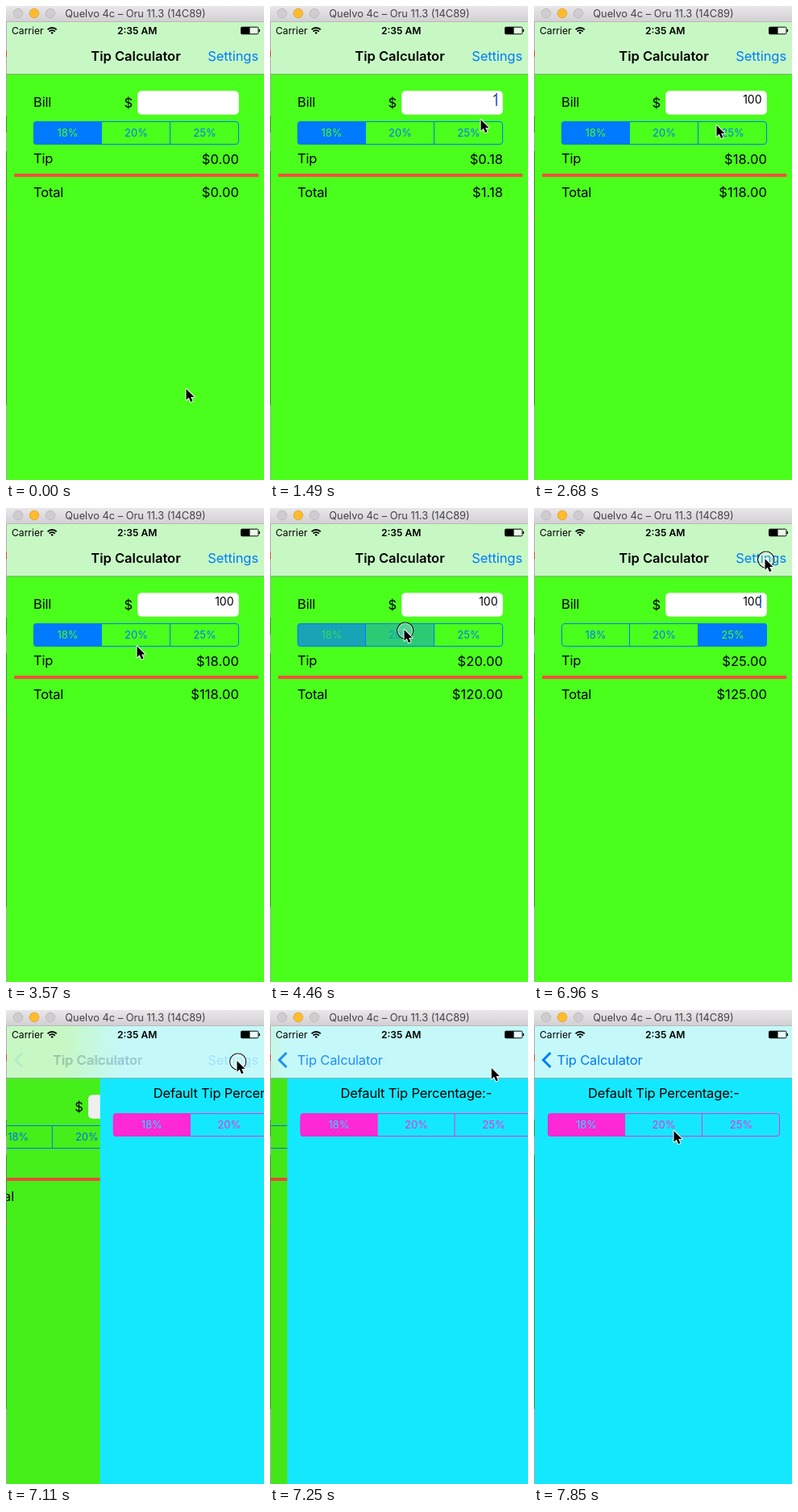
Recreate the animation shown at these times as an HTML page. Size 320 by 588 pixels, loop 7.99 s.

```html
<!DOCTYPE html>
<html lang="en">
<head>
<meta charset="utf-8">
<title>Tip Calculator</title>
<style>
  html, body { margin: 0; height: 100%; overflow: hidden; background: #4aff1b; }
  svg { display: block; width: 100vw; height: 100vh; }
  text { font: 16.5px Inter, Roboto, sans-serif; letter-spacing: -.17px; }
  .small text { font-size: 12.1px; letter-spacing: 0; }
  .seg text { font-size: 13px; letter-spacing: 0; text-anchor: middle; }
  .bold { font-weight: 600; }
  .mid { text-anchor: middle; }
  .end { text-anchor: end; }
  .sum { text-anchor: end; letter-spacing: .1px; }
  .link { fill: #007aff; }
</style>
</head>
<body>
<svg viewBox="0 0 320 588" preserveAspectRatio="none">
  <defs>
    <linearGradient id="chrome" x2="0" y2="1">
      <stop stop-color="#e9e7e9"/><stop offset="1" stop-color="#d1cfd2"/>
    </linearGradient>
    <linearGradient id="blur" gradientUnits="userSpaceOnUse" x1="-35" x2="35">
      <stop stop-color="#c7f8c4"/><stop offset="1" stop-color="#c5f9f9"/>
    </linearGradient>
    <clipPath id="segClip1"><rect x="34" y="143" width="255" height="29" rx="4"/></clipPath>
    <clipPath id="segClip2"><rect x="16" y="128" width="288" height="29" rx="4"/></clipPath>
  </defs>

  <g id="calc">
    <rect width="321" height="588" fill="#4aff1b"/>
    <text x="34" y="124.5">Bill</text>
    <text x="146.5" y="126">$</text>
    <rect x="163.2" y="105.2" width="125.6" height="29.6" rx="5" fill="#fff"/>
    <text id="bill" class="end" x="282.5" y="121" style="font-size:14px;letter-spacing:0"></text>
    <rect id="caret" x="280" y="108" width="1.8" height="16" fill="#4268d8"/>
    <g id="rates" class="seg"></g>
    <text x="34" y="194.5">Tip</text>
    <text id="tip" class="sum" x="289" y="195.5"></text>
    <rect x="10" y="208" width="303" height="4" fill="#fb4f3f"/>
    <text x="34" y="236.5">Total</text>
    <text id="total" class="sum" x="289" y="236.5"></text>
    <rect id="shade" width="420" height="588" opacity="0"/>
  </g>

  <g id="prefs">
    <rect width="320" height="588" fill="#14e8ff"/>
    <text x="66" y="108.5">Default Tip Percentage:-</text>
    <g id="defaults" class="seg"></g>
  </g>

  <rect y="20" width="320" height="65" fill="#c7f8c4"/>
  <g id="tint"><rect x="-35" y="20" width="400" height="65" fill="url(#blur)"/></g>
  <rect y="84" width="320" height="1" opacity=".3"/>
  <g id="bar">
    <text id="heading" class="bold mid" y="68" style="letter-spacing:0">Tip Calculator</text>
    <text class="link end" x="313" y="68" style="letter-spacing:-.1px">Settings</text>
  </g>
  <g id="back">
    <path d="M20.5 53L11.5 62L20.5 71" fill="none" stroke="#007aff" stroke-width="3"/>
    <text id="backText" class="link" y="68">Tip Calculator</text>
  </g>

  <g class="small">
    <text x="7" y="34.5">Carrier</text>
    <text class="bold mid" x="162.7" y="34.5">2:35 AM</text>
  </g>
  <g fill="none" stroke="#000" stroke-width="1.8">
    <path d="M51.6 29.3A8 8 0 0 1 62.8 29.3M53.6 31.6A5 5 0 0 1 60.8 31.6"/>
    <path d="M57.2 35L55.5 33.2A2.4 2.4 0 0 1 58.9 33.2Z" fill="#000" stroke="none"/>
    <rect x="291.5" y="26.2" width="21.5" height="8.6" rx="1.5" stroke-width="1" fill="#fff" fill-opacity=".6"/>
    <path d="M291.5 26.2H302.5V34.8H291.5Z" fill="#000" stroke="none"/>
    <path d="M314.3 29V32" stroke-width="1.4"/>
  </g>

  <rect width="320" height="20" fill="url(#chrome)"/>
  <rect y="19" width="320" height="1" fill="#bab8bb"/>
  <g stroke-width=".8" stroke="#b9b7ba" fill="#cecccf">
    <circle cx="15" cy="9" r="5.8"/>
    <circle cx="35" cy="9" r="5.8" fill="#fdbb2d" stroke="#e0a02a"/>
    <circle cx="55" cy="9" r="5.8"/>
  </g>
  <text class="mid" x="160.5" y="14" fill="#434244" style="font-size:12.8px;letter-spacing:0">Quelvo 4c – Oru 11.3 (14C89)</text>
  <path d="M0 20h1v116h-1zM0 157h1v23h-1zM0 495h1v93h-1z" fill="#b3a3b3"/>
  <path d="M0 136h1v21h-1zM0 180h1v315h-1z" fill="#4f8a40"/>
  <path d="M0 55h1v8h-1zM0 260h1v4h-1z" fill="#e8402c"/>

  <g id="pointer">
    <g id="press" fill="none">
      <circle cx="1.7" cy="1" r="10" fill="#fff" fill-opacity=".2" stroke="#000" stroke-width="1.1"/>
      <circle cx="1.7" cy="1" r="9" stroke="#fff" stroke-opacity=".7"/>
    </g>
    <path d="M.5 0V13.8L3.7 10.8L6.1 16.2L8.5 15.1L6.2 9.9H10.5Z" stroke="#fff" stroke-width="1.9" stroke-linejoin="round" paint-order="stroke"/>
  </g>
</svg>
<script>
const LOOP = 7990, STEPS = 54, RATES = [18, 20, 25];
const $ = id => document.getElementById(id);
const set = (el, name, value) => el.setAttribute(name, value);

// pointer tip: step, x, y
const PATH = [
  [0, 223, 475], [5, 175, 119], [6, 175, 119], [9, 261, 141], [15, 261, 141],
  [18, 226, 148], [20, 195, 98], [22, 176, 171], [23, 174, 168], [25, 150, 175],
  [28, 166, 151], [32, 166, 151], [36, 238, 155], [38, 238, 155], [39, 289, 71],
  [42, 295, 66], [44, 286, 63], [48, 286, 63], [53, 173, 150]
];
const PRESSES = [6, 30, 36, 46, 47, 48];

function segments(id, clip, x, y, w, color, bg) {
  const cell = w / 3;
  const fills = RATES.map((r, i) =>
    `<rect x="${x + i * cell}" y="${y}" width="${cell}" height="29" fill="${color}"/>`).join('');
  const labels = RATES.map((r, i) =>
    `<text x="${x + (i + .5) * cell}" y="${y + 19}">${r}%</text>`).join('');
  $(id).innerHTML = `<g clip-path="url(#${clip})">${fills}</g>
    <g fill="none" stroke="${color}">
      <rect x="${x + .5}" y="${y + .5}" width="${w - 1}" height="28" rx="3.5"/>
      <path d="M${x + cell - .5} ${y}v29M${x + 2 * cell - .5} ${y}v29"/>
    </g>${labels}`;
  const rects = $(id).querySelectorAll('g[clip-path] rect');
  const texts = $(id).querySelectorAll('text');
  // previous differs from chosen while the highlight cross-fades
  return (chosen, previous) => RATES.forEach((r, i) => {
    const fading = chosen !== previous && (i === chosen || i === previous);
    set(rects[i], 'opacity', fading ? (i === previous ? .68 : .4) : +(i === chosen));
    set(texts[i], 'fill', i === previous ? bg : color);
    set(texts[i], 'opacity', fading ? .6 : 1);
  });
}
const showRates = segments('rates', 'segClip1', 34, 143, 255, '#007aff', '#4aff1b');
segments('defaults', 'segClip2', 16, 128, 288, '#ff28d6', '#14e8ff')(0, 0);

function pointerAt(k) {
  const i = Math.max(1, PATH.findIndex(p => p[0] >= k));
  const [k0, x0, y0] = PATH[i - 1], [k1, x1, y1] = PATH[i];
  const u = (k - k0) / (k1 - k0), e = u * u * (3 - 2 * u);
  return [x0 + (x1 - x0) * e, y0 + (y1 - y0) * e];
}

const rateAt = k => k < 30 ? 0 : k < 36 ? 1 : 2;

function caretAt(k) {
  if (k < 6) return 0;
  if (k < 12) return 1;
  const phase = (k - 12) % 7;
  return phase < 4 ? 1 : phase === 4 ? .2 : 0;
}

function draw(k) {
  const bill = '100'.slice(0, Math.max(0, k - 9));
  const rate = rateAt(k), tip = bill * RATES[rate] / 100;
  $('bill').textContent = bill;
  $('tip').textContent = '$' + tip.toFixed(2);
  $('total').textContent = '$' + (+bill + tip).toFixed(2);
  set($('caret'), 'opacity', caretAt(k));
  showRates(rate, rateAt(k - 1));

  // push to the settings page
  const u = Math.min(1, Math.max(0, (k - 47) / 3));
  const p = 1 - (1 - u) ** 2.5, edge = 1 + 319 * (1 - p);
  set($('calc'), 'transform', `translate(${-96 * p})`);
  set($('shade'), 'opacity', .1 * p);
  set($('prefs'), 'transform', `translate(${edge})`);
  set($('tint'), 'transform', `translate(${p < 1 ? edge + 35 * (1 - 2 * p) : -40})`);
  set($('tint'), 'opacity', p > 0 ? 1 : 0);
  set($('bar'), 'opacity', (1 - p) ** 1.7);
  set($('heading'), 'x', 161 - 74 * p);
  set($('back'), 'opacity', Math.max(0, (p - .6) / .4));
  set($('backText'), 'x', 28.5 + 80 * (1 - p));

  set($('pointer'), 'transform', `translate(${pointerAt(k)})`);
  set($('press'), 'opacity', PRESSES.includes(k) ? 1 : 0);
}

const start = performance.now();
function tick() {
  const t = (performance.now() - start) % LOOP;
  draw(Math.floor(t / LOOP * STEPS));
  requestAnimationFrame(tick);
}
tick();
</script>
</body>
</html>
```
